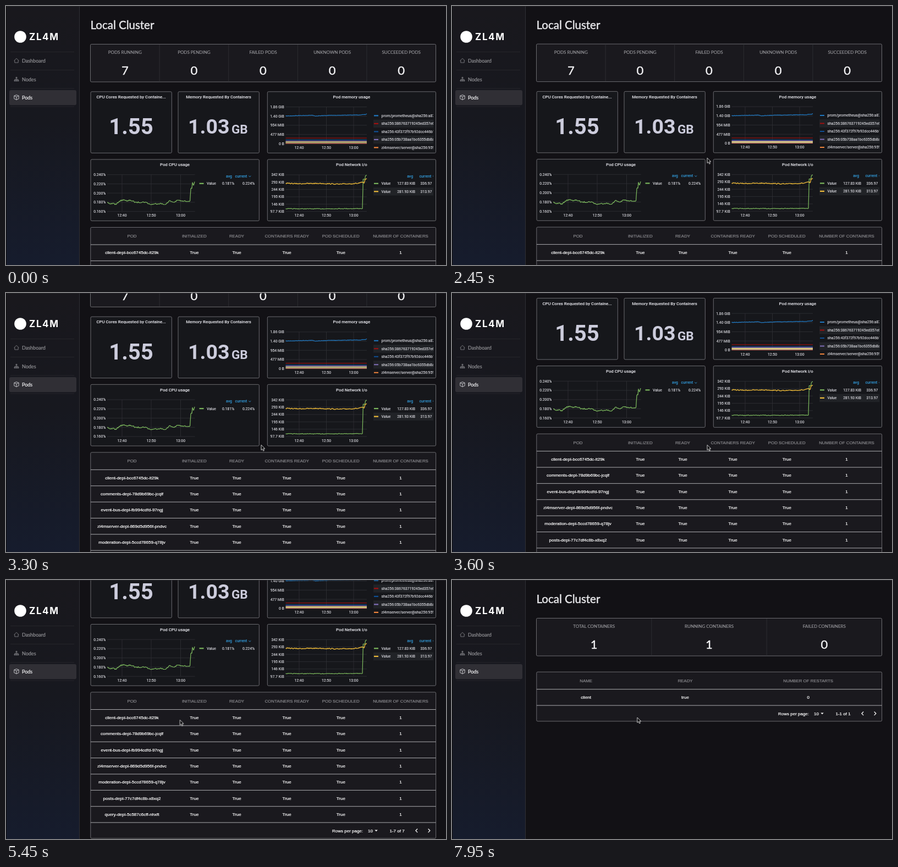
An HTML page for the animation above (8 s loop, 800 by 471 pixels).

```html
<!DOCTYPE html>
<html lang="en">
<head>
<meta charset="utf-8">
<title>Local Cluster</title>
<style>
html, body { margin: 0; width: 100%; height: 100%; overflow: hidden; background: #121115; }
svg { display: block; width: 100%; height: 100%; }
text { white-space: pre; stroke-linejoin: round; }
.lato { font-family: Lato, sans-serif; }
.panel { font-family: Roboto, sans-serif; }
.cell { font-family: "Liberation Sans", Arial, sans-serif; font-size: 8px; fill: #fff; stroke: #fff; stroke-width: .22px; }
.head { font-family: "Liberation Sans", Arial, sans-serif; font-size: 7.9px; fill: #98989c; stroke: #98989c; stroke-width: .1px; }
.title { font-size: 20.5px; fill: #e6e6e9; stroke: #e6e6e9; stroke-width: .5px; }
.label { font-size: 8px; fill: #98989c; stroke: #98989c; stroke-width: .15px; }
.count { font-size: 22px; fill: #f4f4f6; stroke: #f4f4f6; stroke-width: .4px; }
.name { font-size: 7.8px; font-weight: 500; fill: #e2e2e8; stroke: #e2e2e8; stroke-width: .1px; }
.tick { font-size: 6.8px; fill: #dcdce2; stroke: #dcdce2; stroke-width: .15px; }
.link { font-size: 6.8px; font-weight: 500; fill: #33a2e5; }
.stat { font-weight: 700; fill: #ccccdc; }
.nav { font-size: 9px; fill: #929296; stroke: #929296; stroke-width: .2px; }
.nav .active { fill: #f2f2f4; stroke: #f2f2f4; }
.brand { font: 700 17px Inter, sans-serif; letter-spacing: 1.6px; fill: #fff; }

#scroll { animation: scroll 8s infinite; }
#pods { animation: leave 8s step-end infinite; }
#detail { animation: enter 8s step-end infinite; }
#cursor { animation: move 8s infinite, appear 8s step-end infinite; }

@keyframes scroll {
  0%, 30% { transform: translateY(0); animation-timing-function: cubic-bezier(.33, 0, .67, .33); }
  34.375% { transform: translateY(-19.3px); animation-timing-function: cubic-bezier(.33, .25, .67, .67); }
  41.25% { transform: translateY(-112.5px); animation-timing-function: cubic-bezier(.17, .5, .4, 1); }
  51.875%, 54% { transform: translateY(-160.5px); animation-timing-function: cubic-bezier(.35, 0, .4, 1); }
  62%, 100% { transform: translateY(-198.5px); }
}
@keyframes leave { 0% { visibility: visible; } 86.875%, 100% { visibility: hidden; } }
@keyframes enter { 0% { visibility: hidden; } 86.875%, 100% { visibility: visible; } }
@keyframes appear { 0% { visibility: hidden; } 16.875%, 100% { visibility: visible; } }
@keyframes move {
  0%, 16.875% { transform: translate(776px, 438px); animation-timing-function: ease-in-out; }
  24.375%, 63.75% { transform: translate(464px, 276.3px); animation-timing-function: ease-in-out; }
  68.125% { transform: translate(316.5px, 254.5px); animation-timing-function: ease-out; }
  72.5%, 94.375% { transform: translate(264px, 250px); animation-timing-function: ease-in-out; }
  99.375%, 100% { transform: translate(336.8px, 250px); }
}
</style>
</head>
<body>
<svg viewBox="0 0 800 471" preserveAspectRatio="none">
  <defs>
    <linearGradient id="side" x2="0" y2="1">
      <stop offset="0" stop-color="#19181d"/>
      <stop offset=".45" stop-color="#17181f"/>
      <stop offset="1" stop-color="#161c2d"/>
    </linearGradient>
    <clipPath id="legend"><path d="M660 150H777V400H660Z"/></clipPath>
  </defs>
  <rect width="800" height="471" fill="#121115"/>
  <g id="pods"><g id="scroll"></g></g>
  <g id="detail"></g>
  <g id="sidebar">
    <rect width="133.5" height="471" fill="url(#side)"/>
    <path d="M133.5 0V471" stroke="#303035"/>
    <circle cx="26" cy="56" r="10.8" fill="#fff"/>
    <text class="brand" x="42" y="62">ZL4M</text>
    <path d="M8 83.5H124M8 116.5H124M8 150H124M8 183H124" stroke="#29292e" stroke-width=".8"/>
    <rect x="6" y="153" width="122" height="27.3" rx="3" fill="#302f35"/>
    <g fill="none" stroke="#8c8c90" stroke-width=".8">
      <path d="M14.6 99.5L19 95.4L23.4 99.5M15.8 98.8V103H22.2V98.8"/>
      <path d="M19 131V133.4M16 135V133.4H22V135M19 133.4V135"/>
      <path d="M18 129.5h2v1.6h-2zM15 135h2v1.6h-2zM18 135h2v1.6h-2zM21 135h2v1.6h-2z"/>
      <path stroke="#e4e4e8" d="M19 161.7L23.2 163.4V168.6L19 170.6L14.8 168.6V163.4ZM14.8 163.4L19 165.3L23.2 163.4M19 165.3V170.6"/>
    </g>
    <g class="lato nav">
      <text x="29" y="103">Dashboard</text>
      <text x="29" y="136.5">Nodes</text>
      <text x="29" y="170" class="active">Pods</text>
    </g>
  </g>
  <path d="M0 .4H800" stroke="#2b2b2f" stroke-width=".8"/>
  <path d="M.5 0V471" stroke="#0a0a0c"/>
  <path id="cursor" d="M0 0V9.4L2.2 7.4L3.8 10.9L5.4 10.2L3.9 6.8H6.8Z" fill="#08080a" stroke="#fff" stroke-width=".8" stroke-linejoin="round"/>
</svg>
<script>
const GREEN = '#7ab55c', AMBER = '#eab839', BLUE = '#1f78c1';
const CARD = '#1a191e', GRAPH = '#16171b', STRIPE = '#212327';

let seed = 7;
const random = () => (seed = seed * 16807 % 2147483647) / 2147483647;

const text = (cls, x, y, str, anchor = 'middle', extra = '') =>
  `<text class="${cls}" x="${x}" y="${y}" text-anchor="${anchor}" ${extra}>${str}</text>`;
const path = (d, color, width = 1) =>
  `<path d="${d}" fill="none" stroke="${color}" stroke-width="${width}" stroke-linejoin="round"/>`;
const box = (x, y, w, h, fill = GRAPH) =>
  `<rect x="${x}" y="${y}" width="${w}" height="${h}" rx="2" fill="${fill}" stroke="#77777b" stroke-width=".9"/>`;

// Polyline through the points, resampled with a little vertical jitter.
function series(points, color, jitter, width = 1.25) {
  let d = '';
  points.forEach(([x, y], i) => {
    d += `${i ? 'L' : 'M'}${x} ${y}`;
    const next = points[i + 1];
    if (!next) return;
    for (let px = x + 1.3; px < next[0] - .6; px += 1.3) {
      const py = y + (next[1] - y) * (px - x) / (next[0] - x) + (random() - .5) * jitter;
      d += `L${px.toFixed(1)} ${py.toFixed(1)}`;
    }
  });
  return path(d, color, width);
}

function chart(left, right, top, step, labels, times) {
  const bottom = top + step * (labels.length - 1);
  let out = '';
  labels.forEach((label, i) => {
    const y = top + step * i;
    out += path(`M${left} ${y}H${right}`, '#303137', .8) + text('panel tick', left - 2.8, y + 2.4, label, 'end');
  });
  times.forEach((x, i) => {
    out += path(`M${x} ${top}V${bottom}`, '#303137', .8)
      + text('panel tick', x, bottom + 9.6, ['12:40', '12:50', '13:00'][i]);
  });
  return out;
}

const swatch = (x, y, color) => path(`M${x} ${y}h8`, color, 2.2);
const stripe = y => `<rect x="668" y="${y - 7.2}" width="110" height="14.5" fill="${STRIPE}"/>`;

function counters(labels, values) {
  const width = 628 / labels.length;
  let out = box(153.5, 69.5, 628, 68.5, CARD);
  labels.forEach((label, i) => {
    const x = 153.5 + width * i;
    if (i) out += path(`M${x} 70V137.5`, '#2f2f34', .9);
    out += text('lato label', x + width / 2, 87, label) + text('lato count', x + width / 2, 125.3, values[i]);
  });
  return out;
}

function table(top, columns, heads, rows, range) {
  const pitch = 29.37, first = top + 31.5, last = first + pitch * rows.length;
  let out = box(153.8, top, 627.8, last + 28.8 - top, CARD);
  heads.forEach((head, i) => out += text('head', columns[i], top + 18.6, head));
  rows.forEach((row, r) => {
    const y = first + pitch * r;
    out += path(`M154 ${y}H781.5`, '#bdbdc0', .9);
    row.forEach((value, i) => out += text('cell', columns[i], y + 17.4, value));
  });
  const mid = last + 14.7;
  return out + path(`M154 ${last}H781.5`, '#bdbdc0', .9)
    + text('cell', 593, mid + 2.9, 'Rows per page:', 'start')
    + text('cell', 658, mid + 2.9, '10', 'start')
    + `<path d="M670.4 ${mid - 1.2}h5.4l-2.7 2.7z" fill="#fff"/>`
    + text('cell', 697.5, mid + 2.9, range, 'start')
    + path(`M748.2 ${mid - 3.3}l-3.3 3.3l3.3 3.3M767.6 ${mid - 3.3}l3.3 3.3l-3.3 3.3`, '#fff', 1.2);
}

const heading = text('lato title', 153.5, 42, 'Local Cluster', 'start');

function stats() {
  return box(154, 155.8, 147.3, 111.5) + text('panel name', 227.6, 168, 'CPU Cores Requested by Containe...')
    + text('panel stat', 227.5, 233.4, '1.55', 'middle', 'font-size="40"')
    + box(313, 155.8, 147.3, 111.5) + text('panel name', 386.6, 168, 'Memory Requested By Containers')
    + text('panel stat', 331, 232.4, '1.03', 'start', 'font-size="37.5"')
    + text('panel stat', 410, 232.4, 'GB', 'start', 'font-size="22.5"');
}

function memory() {
  let out = box(475.3, 155.8, 306.2, 111.5) + text('panel name', 628.4, 168, 'Pod memory usage')
    + chart(508.5, 656, 183.5, 16.7, ['1.86 GiB', '1.40 GiB', '954 MiB', '477 MiB', '0 B'], [533, 582.5, 632])
    + series([[508.5, 200], [535, 199.2], [556, 198.7], [562, 200], [590, 198.8], [630, 198.3], [653, 197.6], [656, 196]], BLUE, .8);
  const low = [[240.2, '#8f1010'], [243.4, '#0a437c'], [245, '#6d5bb0'], [246.8, '#efe4c4'],
    [247.9, AMBER], [249, '#6ed0e0'], [249.8, '#e2684a']];
  low.forEach(([y, color]) => out += path(`M508.5 ${y}H656`, color, 1.2));
  const legend = [['prom/prometheus@sha256:a87c1', BLUE], ['sha256:386763719245ed357e6b2', '#a01010'],
    ['sha256:43f372f97b92dcc446b1', '#0f4f94'], ['sha256:05b738aa1bc6355db8a4', '#806eb7'],
    ['zl4mserver/server@sha256:959e', '#ef843c']];
  out += '<g clip-path="url(#legend)">';
  legend.forEach(([label, color], i) => {
    const y = 199.4 + 14.5 * i;
    if (i % 2) out += stripe(y);
    out += swatch(669, y, color) + text('panel tick', 682.6, y + 2.4, label, 'start');
  });
  return out + '</g>';
}

function cpu() {
  const trend = [[184, 357], [190, 360], [194, 358.5], [200, 361], [206, 355], [214, 352], [220, 355], [226, 353],
    [235, 357], [253, 356.5], [263, 361], [270, 360], [280, 359], [288, 361], [294, 358], [297, 354],
    [305, 357], [313, 353], [320, 355], [334.5, 354.5], [336, 332.5], [338, 331.5], [339, 321], [341, 326], [343, 319.5]];
  return box(154, 279, 306.3, 111.7) + text('panel name', 307, 291.2, 'Pod CPU usage')
    + chart(184, 343.5, 306.7, 16.75, ['0.240%', '0.220%', '0.200%', '0.180%', '0.160%'], [211, 264, 317.5])
    + series(trend, GREEN, 2.2)
    + text('panel link', 400, 311.8, 'avg', 'start') + text('panel link', 416.6, 311.8, 'current', 'start')
    + path('M441.3 308.8l2 1.8l2-1.8', '#33a2e5', .9)
    + swatch(351.5, 322.8, GREEN) + text('panel tick', 365, 325.2, 'Value', 'start')
    + text('panel tick', 415, 325.2, '0.181%', 'end') + text('panel tick', 452, 325.2, '0.224%', 'end');
}

function network() {
  let out = box(475.3, 279, 306.2, 111.7) + text('panel name', 628.4, 291.2, 'Pod Network i/o')
    + chart(508.5, 656, 307, 13.32, ['342 KiB', '293 KiB', '244 KiB', '195 KiB', '146 KiB', '97.7 KiB'], [533, 582.5, 632])
    + series([[508.5, 368.7], [560, 368.8], [610, 368.5], [648, 368.3], [649.4, 315], [652.5, 315.5], [653.5, 309], [656, 307.5]], GREEN, 1)
    + series([[508.5, 322.5], [530, 323.2], [570, 322.6], [605, 324], [640, 322.6], [646, 320.5], [651, 322], [653, 315.5], [656, 314]], AMBER, 1.5, 1.4)
    + '<g clip-path="url(#legend)">'
    + text('panel link', 740, 311.8, 'avg', 'end') + text('panel link', 751.5, 311.8, 'current', 'start')
    + path('M776 308.8l2 1.8l2-1.8', '#33a2e5', .9);
  [['127.83 KiB', '336.97', GREEN], ['281.93 KiB', '313.97', AMBER]].forEach(([avg, now, color], i) => {
    const y = 322.8 + 14.5 * i;
    if (i % 2) out += stripe(y);
    out += swatch(669, y, color) + text('panel tick', 682.6, y + 2.4, 'Value', 'start')
      + text('panel tick', 744, y + 2.4, avg, 'end') + text('panel tick', 753.5, y + 2.4, now, 'start');
  });
  return out + '</g>';
}

const pods = ['client-depl-bcc6745dc-lt29k', 'comments-depl-78d9b69bc-jcqlf', 'event-bus-depl-fb994cdfd-97ngj',
  'zl4mserver-depl-869d5d956f-pndvc', 'moderation-depl-5ccd78659-q78jv', 'posts-depl-77c7df4c8b-x8xq2',
  'query-depl-5c587c6cff-nhxft'];

document.getElementById('scroll').innerHTML = heading
  + counters(['PODS RUNNING', 'PODS PENDING', 'FAILED PODS', 'UNKNOWN PODS', 'SUCCEEDED PODS'], [7, 0, 0, 0, 0])
  + stats() + memory() + cpu() + network()
  + table(402.5, [229, 342.3, 419.5, 510.7, 608.8, 717.5],
    ['POD', 'INITIALIZED', 'READY', 'CONTAINERS READY', 'POD SCHEDULED', 'NUMBER OF CONTAINERS'],
    pods.map(pod => [pod, 'True', 'True', 'True', 'True', '1']), '1-7 of 7');

document.getElementById('detail').innerHTML = heading
  + counters(['TOTAL CONTAINERS', 'RUNNING CONTAINERS', 'FAILED CONTAINERS'], [1, 1, 0])
  + table(167.2, [243.7, 424, 647.7], ['NAME', 'READY', 'NUMBER OF RESTARTS'], [['client', 'true', '0']], '1-1 of 1');
</script>
</body>
</html>
```
